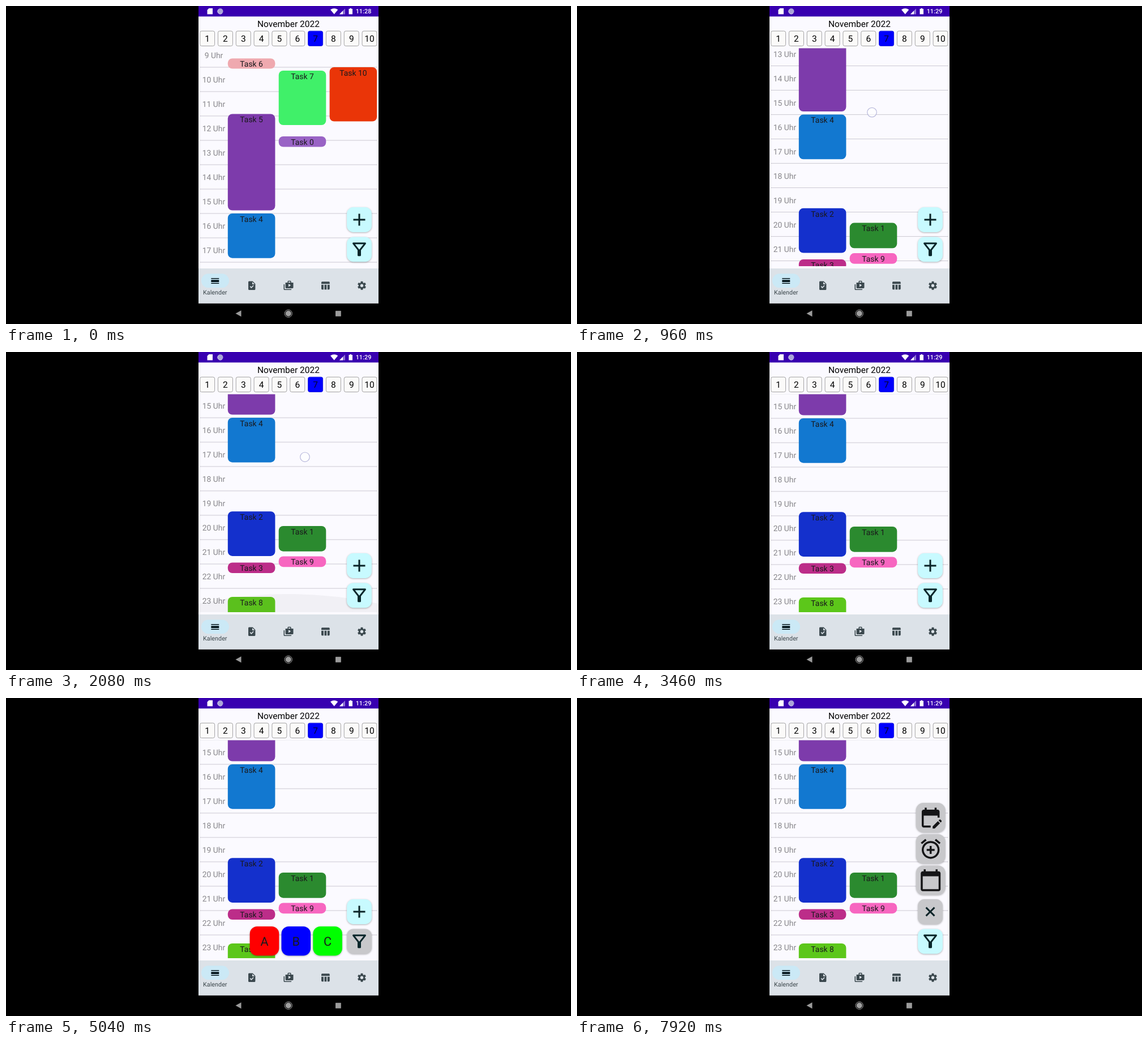
An HTML page that plays this animation: 998x561 px, repeating every 8000 ms.

```html
<!DOCTYPE html>
<html lang="de">
<head>
<meta charset="utf-8">
<title>Kalender</title>
<style>
  html, body { margin: 0; width: 100%; height: 100%; overflow: hidden; background: #000; }
  svg { display: block; width: 100vw; height: 100vh; }
  text { font-family: Roboto, "Noto Sans", sans-serif; text-anchor: middle; text-rendering: geometricPrecision; }
  .fab { filter: drop-shadow(0 1.2px 1.4px rgba(0, 0, 0, .3)); }
</style>
</head>
<body>
<svg id="stage" viewBox="0 0 998 561" preserveAspectRatio="none">
  <defs><clipPath id="view"><rect x="340" y="74.5" width="318" height="384.5"/></clipPath></defs>
</svg>
<script>
const LOOP = 8000, HOUR = 43;
const CYAN = [200, 250, 255], GREY = [200, 200, 203];
const stage = document.getElementById('stage');

function add(parent, tag, attrs, label) {
  const el = document.createElementNS('http://www.w3.org/2000/svg', tag);
  for (const key in attrs) el.setAttribute(key, attrs[key]);
  if (label !== undefined) el.textContent = label;
  return parent.appendChild(el);
}
const group = (parent, attrs = {}) => add(parent, 'g', attrs);
const rect = (parent, x, y, width, height, fill, rx = 0) =>
  add(parent, 'rect', { x, y, width, height, fill, rx });
const circle = (parent, cx, cy, r, fill, more) => add(parent, 'circle', { cx, cy, r, fill, ...more });
const path = (parent, d, fill, more) => add(parent, 'path', { d, fill, ...more });
const label = (parent, x, y, size, fill, str, weight = 400) =>
  add(parent, 'text', { x, y, 'font-size': size, fill, 'font-weight': weight }, str);
// Icons are drawn on a 24 unit grid around their centre.
const icon = (parent, x, y, scale, d, fill) =>
  path(parent, d, fill, { transform: `translate(${x} ${y}) scale(${scale}) translate(-12 -12)`, 'fill-rule': 'evenodd' });

const ICONS = {
  day: 'M3 17h18v2H3zM3 10h18v5H3zM3 6h18v2H3z',
  task: 'M14 2H6c-1.1 0-2 .9-2 2V20c0 1.1.9 2 2 2H18c1.1 0 2-.9 2-2V8zM10.94 18L7.4 14.46l1.41-1.41 2.12 2.12 4.24-4.24 1.41 1.41zM13 9V3.5L18.5 9z',
  media: 'M3 9H1v11c0 1.1.9 2 2 2h14c1.1 0 2-.9 2-2H3zM18 5V3c0-1.1-.9-2-2-2h-4c-1.1 0-2 .9-2 2v2H5v11c0 1.1.9 2 2 2h14c1.1 0 2-.9 2-2V5zM12 3h4v2h-4zM12 15V8l5.5 3z',
  table: 'M10 10h5V21h-5zM17 21h3c1.1 0 2-.9 2-2v-9h-5zM20 3H5c-1.1 0-2 .9-2 2v3h19V5c0-1.1-.9-2-2-2zM3 19c0 1.1.9 2 2 2h3V10H3z',
  plus: 'M19 13h-6v6h-2v-6H5v-2h6V5h2v6h6z',
  filter: 'M7 6h10l-5 6.3zM4.25 5.6L10 13v6c0 .55.45 1 1 1h2c.55 0 1-.45 1-1v-6l5.75-7.4C20.25 4.95 19.8 4 18.95 4H5.05C4.2 4 3.75 4.95 4.25 5.6z',
  edit: 'M12 22H5c-1.1 0-2-.9-2-2V6c0-1.1.9-2 2-2h1V2h2v2h8V2h2v2h1c1.1 0 2 .9 2 2v6h-2v-2H5v10h7zM22.1 17l.7-.7c.4-.4.4-1 0-1.4l-.7-.7c-.4-.4-1-.4-1.4 0l-.7.7zM21.4 17.7l-5.3 5.3H14v-2.1l5.3-5.3z',
  alarm: 'M7.9 3.4L6.6 1.9 2 5.7l1.3 1.5zM22 5.7l-4.6-3.8-1.3 1.5 4.6 3.8zM12 4a9 9 0 1 0 .01 0zM12 6a7 7 0 1 1-.01 0zM13 9h-2v3H8v2h3v3h2v-3h3v-2h-3z',
  today: 'M20 3h-1V1h-2v2H7V1H5v2H4c-1.1 0-2 .9-2 2v16c0 1.1.9 2 2 2h16c1.1 0 2-.9 2-2V5c0-1.1-.9-2-2-2zM20 21H4V8h16z'
};

// name, column, top, height, colour
const TASKS = [
  [6, 0, 92.5, 18, '#efa9af'], [7, 1, 114, 96, '#40f069'], [10, 2, 108, 95.5, '#ea3508'],
  [5, 0, 190.5, 170, '#7d3bab'], [0, 1, 230, 18.5, '#9963c5'], [4, 0, 366, 78.7, '#1278d0'],
  [2, 0, 531.2, 78.7, '#1430cc'], [1, 1, 557, 44.7, '#2b8a2f'], [9, 1, 610.5, 18.7, '#f766c0'],
  [3, 0, 621.5, 18.5, '#bc2d89'], [8, 0, 682, 45, '#5cc71a']
];

rect(stage, 0, 0, 998, 561, '#000');
rect(stage, 340, 0, 318, 524.5, '#fbfaff');

// Scrolling day view
const clip = group(stage, { 'clip-path': 'url(#view)' });
const list = group(clip);
for (let h = 9; h <= 23; h++) {
  const y = 87 + (h - 9) * HOUR;
  rect(list, 342, y + 20.5, 314, 1, '#cbcad1');
  label(list, 367, y + 5, 13.9, '#87868a', h + ' Uhr');
}
for (const [name, col, y, height, fill] of TASKS) {
  const x = 391.8 + col * 89.9;
  rect(list, x, y, 83.6, height, fill, 8);
  label(list, x + 41.8, y + 14.8, 13.9, '#1a191c', 'Task ' + name);
}
const glow = path(clip, 'M340 459V444Q499 410 658 444V459z', '#555');

// Status bar
rect(stage, 340, 0, 318, 18.5, '#3800b0');
path(stage, 'M358.5 4H365V14.5H355.5V7z', '#fff');
circle(stage, 378.5, 9.3, 5, '#aaa4d8');
path(stage, 'M375 6.5A4.5 4.5 0 0 0 382 12.5', 'none', { stroke: '#d5d1ee', 'stroke-width': 1 });
path(stage, 'M573 6.5Q579.7 2 586.3 6.5L579.7 14.5z', '#fff');
path(stage, 'M589 14.5L599 4.5V14.5z', '#8d72d2');
path(stage, 'M589 14.5L595 8.5V14.5z', '#fff');
path(stage, 'M605.5 5h2V4h2.5v1h2V14.5h-6.5z', '#fff');
const clock = label(stage, 631.5, 13.2, 10.9, '#fff', '11:28', 500);

// Month and days
label(stage, 499, 37.3, 15.5, '#000', 'November 2022');
for (let d = 1; d <= 10; d++) {
  const x = 355.6 + (d - 1) * 31.83, today = d === 7;
  add(stage, 'rect', {
    x: x - 13, y: 44.2, width: 26, height: 26.3, rx: 3,
    fill: today ? '#0000ff' : '#fbfaf9', stroke: today ? '#2222dd' : '#a3a3a3'
  });
  label(stage, x, 63.2, 15.5, today ? '#05052a' : '#000', d);
}

// Bottom navigation
rect(stage, 340, 463, 318, 61.5, '#dce2e8');
rect(stage, 345, 472.3, 49, 24.7, '#cbe9f6', 12.3);
icon(stage, 369.3, 484.7, .773, ICONS.day, '#00131a');
label(stage, 369.3, 509, 10.8, '#3c474c', 'Kalender');
const INK = '#3b484e';
icon(stage, 434.2, 493.3, .773, ICONS.task, INK);
icon(stage, 499, 493.3, .773, ICONS.media, INK);
icon(stage, 564, 493.3, .773, ICONS.table, INK);
const gear = group(stage, { transform: 'translate(628.5 493.3)' });
circle(gear, 0, 0, 4.1, 'none', { stroke: INK, 'stroke-width': 2.8 });
for (let a = 0; a < 360; a += 60)
  path(gear, 'M-2.4-4.6L-1.7-7.5H1.7L2.4-4.6z', INK, { transform: `rotate(${a})` });

// System keys
path(stage, 'M405.5 542.5L415.5 537V548z', '#9b9b9b');
circle(stage, 498.8, 542.5, 6.6, 'none', { stroke: '#a5a5a5', 'stroke-width': 1 });
circle(stage, 498.8, 542.5, 5, '#a0a0a0');
rect(stage, 582, 537.7, 9.8, 9.8, '#9b9b9b', .5);

// Floating buttons are centred on their own origin so they can grow.
function fab(x, y, size, fill, rx) {
  const place = group(stage, { transform: `translate(${x} ${y})`, class: 'fab' });
  const body = group(place);
  const box = rect(body, -size / 2, -size / 2, size, size, fill, rx);
  return { body, box };
}
const plus = fab(624, 377, 43.8, '#fff', 11.5);
plus.icon = group(plus.body);
icon(plus.icon, 0, 0, 1.5, ICONS.plus, '#0a2327');
const filter = fab(624, 429.3, 43.8, '#fff', 11.5);
icon(filter.body, 0, 0, 1.5, ICONS.filter, '#08262a');

const choices = [['A', '#ff0000'], ['B', '#0000ff'], ['C', '#00ff00']].map(([name, fill], i) => {
  const f = fab(456.5 + i * 55.8, 428.8, 51.6, fill, 13);
  label(f.body, 0, 8.6, 21.7, '#191a1c', name);
  return f;
});
const entries = ['edit', 'alarm', 'today'].map((name, i) => {
  const f = fab(624.7, 211 + i * 55.2, 51.8, `rgb(${GREY})`, 13);
  icon(f.body, 0, 0, 1.75, ICONS[name], '#151517');
  return f;
});

const touch = circle(stage, 0, 0, 8.3, 'rgba(255,255,255,.6)', { stroke: '#b9b9dc', 'stroke-width': 1.2 });

const clamp = v => Math.max(0, Math.min(1, v));
const ramp = (t, from, to) => clamp((t - from) / (to - from));
const smooth = p => p * p * (3 - 2 * p);
const mix = (a, b, p) => a + (b - a) * p;
const tint = p => `rgb(${CYAN.map((c, i) => Math.round(mix(c, GREY[i], p)))})`;

function grow(button, p) {
  button.body.setAttribute('transform', `scale(${mix(.4, 1, p)})`);
  button.body.setAttribute('opacity', p);
}

function scrollAt(t) {
  const drag = 175 * smooth(ramp(t, 420, 980)) ;
  const fling = 1 - (1 - ramp(t, 980, 1560)) ** 3;
  const pull = smooth(ramp(t, 1740, 1900));
  return drag + 45 * fling + 30 * pull - ramp(t, 2230, 2290);
}

function draw(t) {
  list.setAttribute('transform', `translate(0 ${-scrollAt(t)})`);
  clock.textContent = t < 420 ? '11:28' : '11:29';
  glow.setAttribute('opacity', .055 * ramp(t, 1860, 2050) * (1 - ramp(t, 2150, 2330)));

  const second = t > 1500;
  const swipe = second ? smooth(ramp(t, 1740, 2060)) : smooth(ramp(t, 420, 980));
  touch.setAttribute('cx', second ? 528 : 521);
  touch.setAttribute('cy', second ? mix(330, 185.3, swipe) : mix(362, 187, swipe));
  const down = second ? t > 1700 && t < 2260 : t > 380 && t < 1010;
  touch.setAttribute('visibility', down ? 'visible' : 'hidden');

  const picked = ramp(t, 4780, 4920) - ramp(t, 6560, 6690);
  filter.box.setAttribute('fill', tint(picked));
  const shown = smooth(ramp(t, 4800, 4960)) - smooth(ramp(t, 6750, 6900));
  choices.forEach(f => grow(f, shown));

  const open = smooth(ramp(t, 7300, 7500));
  plus.box.setAttribute('fill', tint(open));
  plus.icon.setAttribute('transform', `rotate(${45 * open})`);
  plus.icon.setAttribute('opacity', t > 6640 && t < 6800 ? .82 : 1);
  entries.forEach(f => grow(f, open));
}

function tick(now) {
  draw(now % LOOP);
  requestAnimationFrame(tick);
}
draw(0);
requestAnimationFrame(tick);
</script>
</body>
</html>
```
